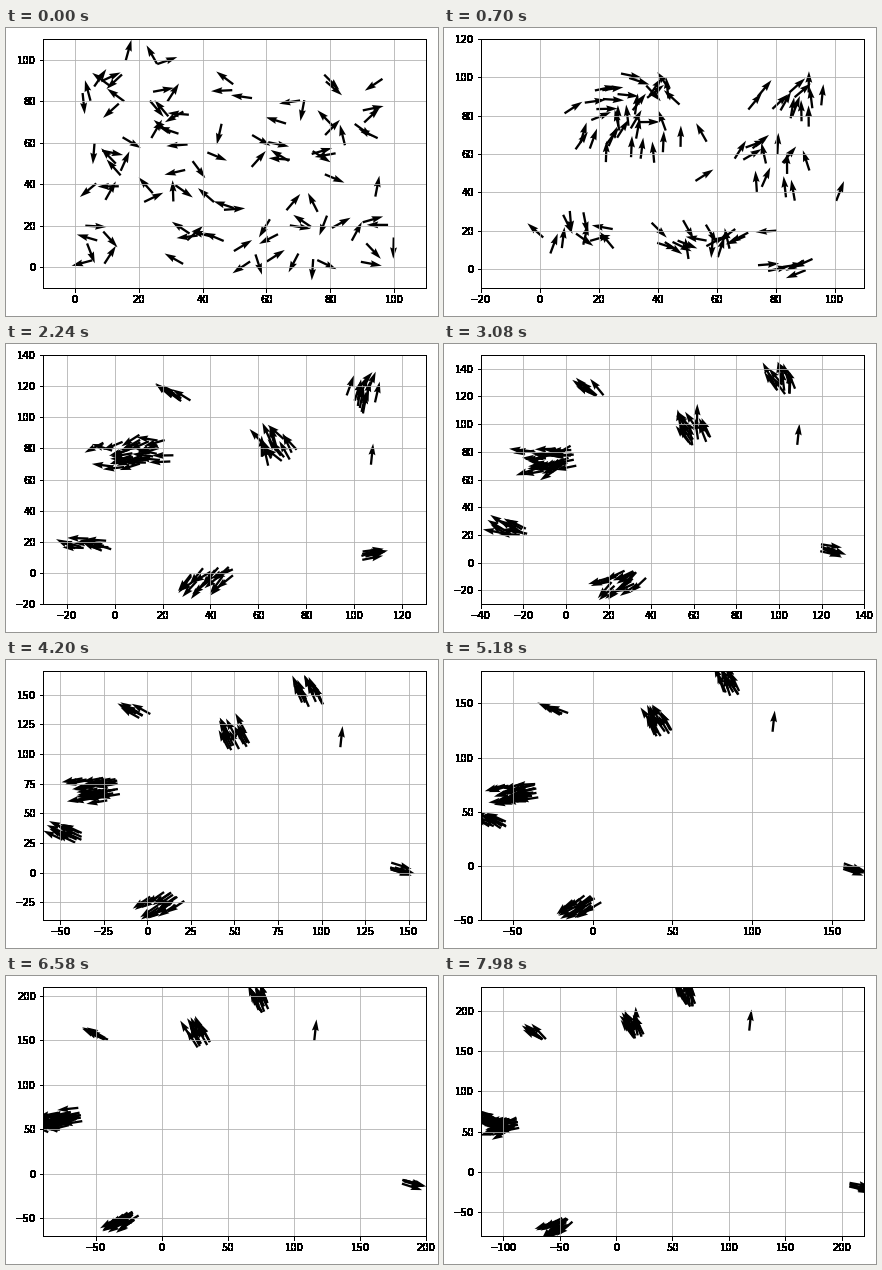
A matplotlib script for the animation above (8000 ms loop, 432 by 288 pixels).

```python
from itertools import combinations

import numpy as np
import matplotlib.pyplot as plt
from matplotlib.animation import FuncAnimation

W, H, DPI = 432, 288, 72
LOOP, TICK, HOLD = 8000, 40, 140      # milliseconds
SPEED = 2.6                           # units per step
KNOTS = [0, 10, 22, 57]               # loose, gathering, formed, end

# size, meeting point when formed, heading before and after it
FLOCKS = [
    (32, (-7, 74.5), 190, 190),
    (17, (29, -12), 220, 214),
    (14, (61, 92), 120, 118),
    (13, (103, 128), 73, 114),
    (11, (-24, 22), 171, 155),
    (6, (123, 10), 10, -17),
    (1, (108.6, 85), 84, 84),
    (6, (15, 121), 142, 151),
]
N = sum(f[0] for f in FLOCKS)

# Reach of the crowd at each knot: low x, high x, low y, high y
REACH = [(1, -15, -24, -101.5), (95, 100.5, 126.9, 203.9),
         (1, 1, -17, -68), (99, 107, 134.6, 215)]

rng = np.random.default_rng(11)


def unit(deg):
    a = np.radians(deg)
    return np.stack([np.cos(a), np.sin(a)], axis=-1)


def flock_knots(size, meet, before, after):
    """Positions and headings of one flock at the three later knots."""
    ahead = unit(after)
    side = np.array([-ahead[1], ahead[0]])
    radius = 2 * np.sqrt(size - 1)
    u, v = rng.uniform(-radius, radius, (2, size, 1))
    late = u * ahead + 0.75 * v * side
    early = 1.1 * late + rng.laplace(0, 0.3, (size, 2)) * radius
    wobble = rng.normal(0, 1, size) * (size > 1)

    formed = meet + late
    pos = [meet - 12 * SPEED * unit(before) + early,
           formed,
           formed + 35 * SPEED * ahead - 0.1 * late]
    # The turn is centred on the way between the first two knots
    head = [unit(2 * before - after + 14 * wobble),
            unit(after + 11 * wobble),
            unit(after + 9 * wobble)]
    return np.stack(pos), np.stack(head)


def match(start, goal):
    """Pair starts with goals so that the ways stay short."""
    cost = ((start[:, None] - goal[None]) ** 2).sum(-1)
    slot = list(range(N))
    for _ in range(12):
        for i, j in combinations(range(N), 2):
            a, b = slot[i], slot[j]
            if cost[i, b] + cost[j, a] < cost[i, a] + cost[j, b]:
                slot[i], slot[j] = b, a
    return slot


start = rng.uniform(0, 100, (N, 2))
start_head = unit(rng.uniform(0, 360, N))
parts = [flock_knots(*f) for f in FLOCKS]
later, later_head = (np.concatenate(p, axis=1) for p in zip(*parts))
order = match(start + 10 * start_head, later[0] - 10 * later_head[0])
POS = [start, *later[:, order]]
VEL = [SPEED * start_head, *(SPEED * later_head[:, order])]


def state(step):
    """Position and unit heading of every arrow on its Hermite path."""
    k = min(np.searchsorted(KNOTS, step, side="right") - 1, len(KNOTS) - 2)
    span = KNOTS[k + 1] - KNOTS[k]
    s = (step - KNOTS[k]) / span
    a, b = POS[k], POS[k + 1]
    m, n = VEL[k] * span, VEL[k + 1] * span
    pos = (a + (b - a) * s * s * (3 - 2 * s)
           + m * s * (1 - s) ** 2 - n * s * s * (1 - s))
    vel = ((b - a) * 6 * s * (1 - s)
           + m * (1 - s) * (1 - 3 * s) + n * s * (3 * s - 2))
    return pos, vel / np.linalg.norm(vel, axis=1, keepdims=True)


def limits(step):
    """Axis limits: the reach, rounded outwards to tens, plus ten."""
    x0, x1, y0, y1 = (np.interp(step, KNOTS, r) / 10 for r in REACH)
    low = [10 * np.floor(v) - 10 for v in (x0, y0)]
    high = [10 * np.ceil(v) + 10 for v in (x1, y1)]
    return zip(low, high)


def harden(img, dpi):
    """Turn every touched pixel solid black."""
    out = np.zeros_like(img)
    out[..., 3] = img[..., 3] > 0
    return out, 0, 0


fig = plt.figure(figsize=(W / DPI, H / DPI), dpi=DPI, facecolor="white")
left, right, top, bottom = 36.8, 420.1, 10.8, 260.2
box = [left / W, 1 - bottom / H, (right - left) / W, (bottom - top) / H]
ax = fig.add_axes(box)
ax.grid(True)
ax.tick_params(length=0, labelleft=False, labelbottom=False)

# Border, ticks and labels lie on top without soft edges
frame = fig.add_axes(box, sharex=ax, sharey=ax, facecolor="none")
frame.set_agg_filter(harden)

xy, uv = state(0)
arrows = ax.quiver(*xy.T, *uv.T, scale=18, width=0.006, color="black")


def draw(i):
    step = (i * TICK + TICK // 2) // HOLD
    xy, uv = state(step)
    arrows.set_offsets(xy)
    arrows.set_UVC(*uv.T)
    xlim, ylim = limits(step)
    ax.set(xlim=xlim, ylim=ylim)
    return [arrows]


anim = FuncAnimation(fig, draw, frames=LOOP // TICK, interval=TICK,
                     repeat=True, repeat_delay=0, blit=False)
plt.show()
```
